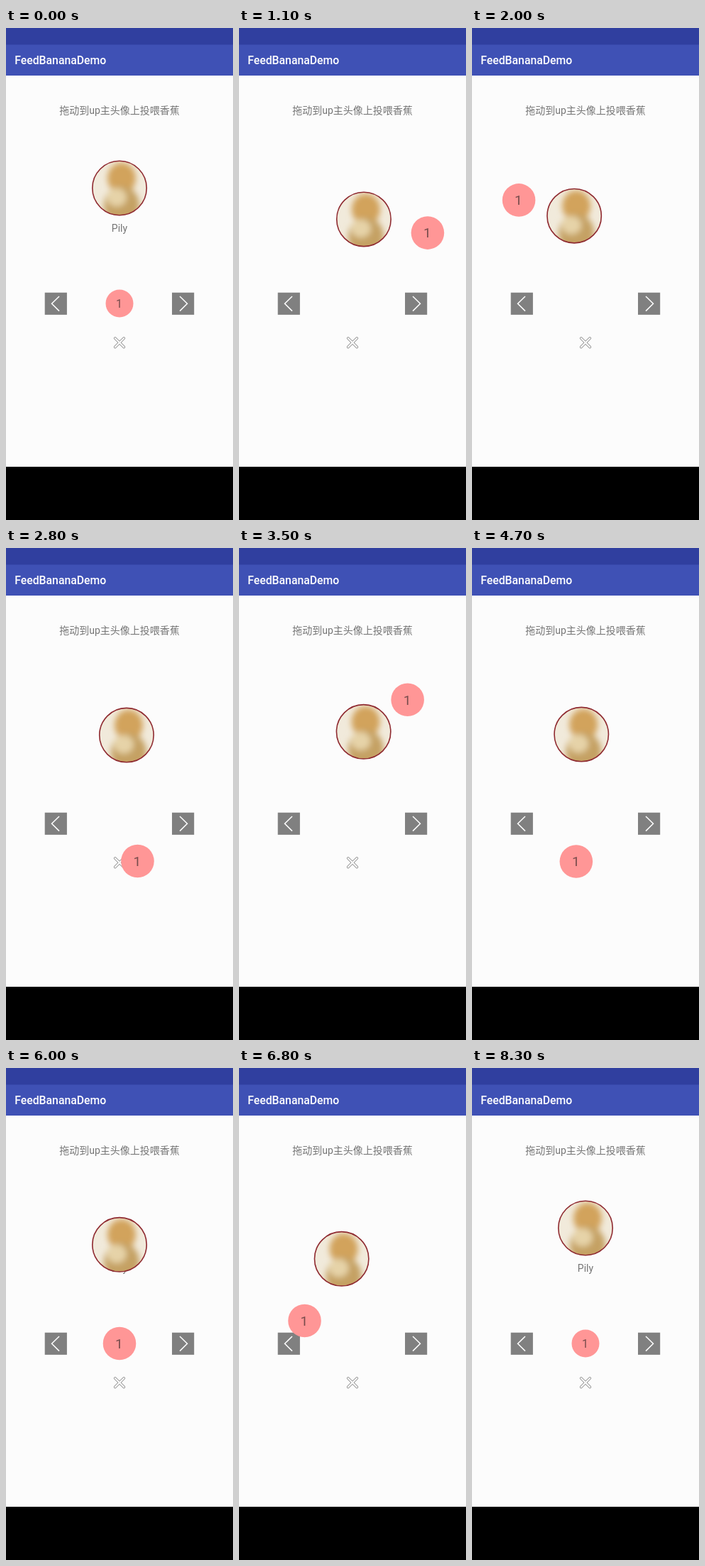
These frames come from a looping animation (320x693 px, 8.4 s). An HTML page:

```html
<!DOCTYPE html>
<html lang="zh">
<head>
<meta charset="utf-8">
<title>FeedBananaDemo</title>
<style>
  html, body { margin: 0; width: 100%; height: 100%; overflow: hidden; background: #000; }
  svg { display: block; width: 100%; height: 100%; }
  text { font-family: Roboto, "Noto Sans CJK SC", "Noto Sans CJK", sans-serif; font-size: 14px; fill: #757575; text-anchor: middle; }
  .title { font-size: 15.8px; font-weight: 500; fill: #fff; text-anchor: start; }
  .count { font-size: 16px; fill: #774c4c; }
  .line { fill: none; stroke: #fff; stroke-width: 1.5; }
  .cross { fill: none; stroke-linecap: round; }
</style>
</head>
<body>
<svg viewBox="0 0 320 693">
  <defs>
    <clipPath id="round"><circle r="38.2"/></clipPath>
    <filter id="soft" x="-40%" y="-40%" width="180%" height="180%"><feGaussianBlur stdDeviation="4"/></filter>
  </defs>
  <rect width="320" height="693" fill="#000"/>
  <rect y="23" width="320" height="595" fill="#fcfcfc"/>
  <rect width="320" height="24" fill="#303f9f"/>
  <rect y="23.5" width="320" height="43.5" fill="#3f51b5"/>
  <text class="title" x="12.2" y="51.3">FeedBananaDemo</text>
  <text x="160" y="120.5">拖动到up主头像上投喂香蕉</text>
  <text x="160" y="287">Pily</text>

  <g fill="#808080">
    <rect x="54.7" y="372.7" width="31.2" height="31.2"/>
    <rect x="234" y="372.7" width="31.2" height="31.2"/>
  </g>
  <path class="line" d="M75 378L64.5 388.3L75 398.6M245 378L255.5 388.3L245 398.6"/>
  <g class="cross">
    <path d="M153.8 437L166.2 449.4M166.2 437L153.8 449.4" stroke="#858585" stroke-width="3.8"/>
    <path d="M153.8 437L166.2 449.4M166.2 437L153.8 449.4" stroke="#fcfcfc" stroke-width="2.2"/>
  </g>

  <g id="avatar">
    <g clip-path="url(#round)">
      <circle r="39" fill="#f1eadb"/>
      <g filter="url(#soft)">
        <ellipse cx="3" cy="-14" rx="20" ry="22" fill="#d2a35c"/>
        <ellipse cx="3" cy="24" rx="25" ry="27" fill="#c5a163"/>
        <ellipse cx="-4" cy="13" rx="14" ry="13" fill="#e6d3a8"/>
      </g>
    </g>
    <circle r="38.2" fill="none" stroke="#8f2a30" stroke-width="1.6"/>
  </g>
  <g id="ball">
    <circle r="19.5" fill="#ff9696"/>
    <text class="count" x="-0.5" y="5.7">1</text>
  </g>
</svg>
<script>
const LOOP = 8400, STEP = 100;
const HOME = { x: 160, y: 388 }, FACE = { x: 160, y: 225.5 };

function ramp(t, from, to) {
  const u = Math.min(1, Math.max(0, (t - from) / (to - from)));
  return u * u * (3 - 2 * u);
}

const hold = (t, down, downEnd, up, upEnd) => ramp(t, down, downEnd) - ramp(t, up, upEnd);
const circling = t => hold(t, 700, 1100, 4950, 5300);
const pulling = t => hold(t, 5880, 6080, 7300, 7600);

// First drag: counterclockwise laps that get narrower
function orbit(t) {
  const s = (t - 2000) / 1000;
  const angle = (241.4 + 162.5 * s + 3.7 * s * s) * Math.PI / 180;
  const width = 107 - 40 * Math.max(0, s - 1.5);
  return { x: 160 + width * Math.sin(angle), y: 308 + 137 * Math.cos(angle) };
}

// Second drag: out to the left and back
function ballAt(t) {
  const target = orbit(t), near = circling(t);
  const out = ramp(t, 6150, 6800) - ramp(t, 6800, 7450);
  return {
    x: HOME.x + near * (target.x - HOME.x) - 67.5 * out,
    y: HOME.y + near * (target.y - HOME.y) - 32 * out
  };
}

// The avatar drops while the ball is held and leans towards it
function avatarAt(ball, grip) {
  const dx = ball.x - FACE.x, dy = ball.y - FACE.y;
  const lean = Math.abs(dx) * dy / (dx * dx + dy * dy + 1);
  return {
    x: FACE.x + grip * 16 * Math.tanh(dx / 35),
    y: FACE.y + grip * (36 + 18 * lean)
  };
}

function place(id, p, scale = 1) {
  document.getElementById(id).setAttribute("transform", `translate(${p.x} ${p.y}) scale(${scale})`);
}

const start = performance.now();
function draw() {
  const time = (performance.now() - start) % LOOP;
  const t = Math.floor(time / STEP) * STEP;
  const grip = circling(t) + pulling(t);
  const ball = ballAt(t);
  place("avatar", avatarAt(ball, grip));
  place("ball", ball, 1 + 0.195 * Math.min(1, grip * 1.6));
  requestAnimationFrame(draw);
}
draw();
</script>
</body>
</html>
```
